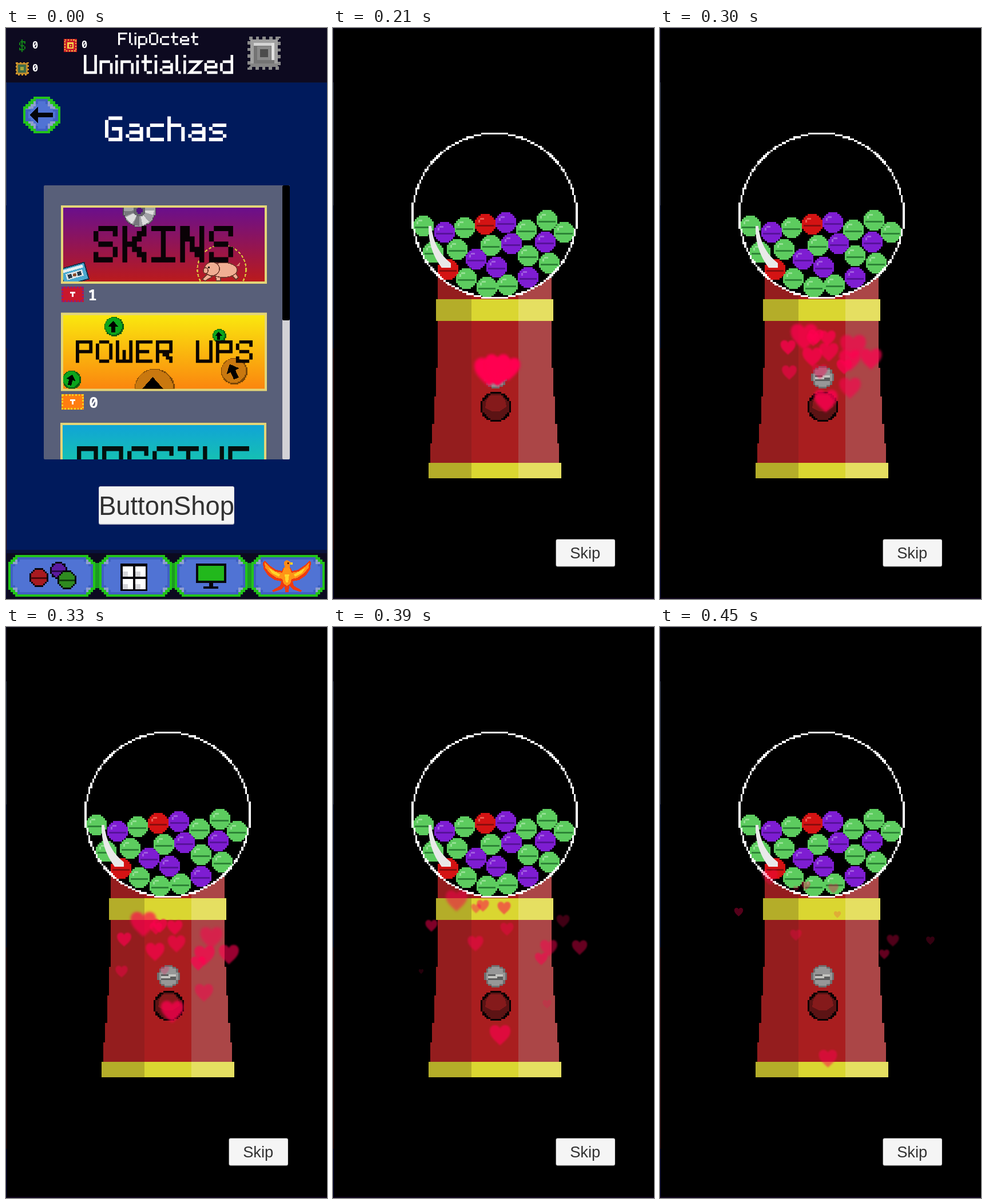
Recreate the animation shown at these times as an HTML page. Size 561 by 998 pixels, loop 550 ms.

```html
<!DOCTYPE html>
<html lang="en">
<head>
<meta charset="utf-8">
<title>Gachas</title>
<style>
html, body { margin: 0; width: 100%; height: 100%; overflow: hidden; background: #000; }
#stage { display: block; width: 100vw; height: 100vh; }
.sans { font-family: "Liberation Sans", Arial, sans-serif; fill: #323232; text-anchor: middle; }
.mono { font-family: "Noto Sans Mono", monospace; font-weight: 700; fill: #fff; }
</style>
</head>
<body>
<svg id="stage" viewBox="0 0 561 998" xmlns="http://www.w3.org/2000/svg"></svg>
<script>
const LOOP = 550, OPEN = 120, BURST = 210, STEP = 30;
const stage = document.getElementById('stage');

// ---- drawing helpers ----
const rect = (x, y, w, h, fill, more = '') =>
  `<rect x="${x}" y="${y}" width="${w}" height="${h}" fill="${fill}" ${more}/>`;
const path = (d, fill, more = '') => `<path d="${d}" fill="${fill}" ${more}/>`;
const text = (s, x, y, size, cls) =>
  `<text x="${x}" y="${y}" font-size="${size}" class="${cls}">${s}</text>`;
const group = (body, more = '') => `<g ${more}>${body}</g>`;
const crisp = body => group(body, 'shape-rendering="crispEdges"');
const crop = (x, y, w, h, body) =>
  `<svg x="${x}" y="${y}" width="${w}" height="${h}" viewBox="${x} ${y} ${w} ${h}">${body}</svg>`;

// Circle built from rows of square cells
function discPath(cx, cy, r, u) {
  const n = Math.round(2 * r / u), odd = n % 2;
  let d = '';
  for (let j = 0; j < n; j++) {
    const y = j + 0.5 - n / 2;
    const w = (2 * Math.round(Math.sqrt(n * n / 4 - y * y) - odd / 2) + odd) * u;
    d += `M${cx - w / 2} ${cy + (j - n / 2) * u}h${w}v${u}h${-w}z`;
  }
  return d;
}
const disc = (cx, cy, r, u, fill) => path(discPath(cx, cy, r, u), fill);

// Box with stepped corners
function stepBox(x, y, w, h, n, u, fill) {
  const c = n * u, run = s => s.repeat(n);
  return path(`M${x + c} ${y}h${w - 2 * c}` + run(`v${u}h${u}`) + `v${h - 2 * c}` +
    run(`h${-u}v${u}`) + `h${2 * c - w}` + run(`v${-u}h${-u}`) + `v${2 * c - h}` +
    run(`h${u}v${-u}`) + 'z', fill);
}

function plate(x, y, w, h, n, u) {
  const c = (n + 1) * u, box = (i, fill) =>
    stepBox(x + i * u, y + i * u, w - 2 * i * u, h - 2 * i * u, n, u, fill);
  return box(0, '#22c41a') + box(1, '#8e9fce') +
    rect(x + c, y + u, w - 2 * c, h - 2 * u, '#3f60c2') +
    rect(x + u, y + c, w - 2 * u, h - 2 * c, '#3f60c2') + box(2, '#5073d4');
}

// ---- pixel lettering, drawn as strokes on a 5 x 7 grid ----
const lower = {
  n: 'M0 2V6M1 2H3M4 3V6', i: 'M0 0h.01M0 2V6', t: 'M0 2H3M1 0V5M2 6H3',
  l: 'M0 0V5M1 6h.01', a: 'M1 2H3M4 3V6H1M0 5h.01M1 4H4', z: 'M0 2H4L0 6H4',
  e: 'M4 4V3M1 2H3M0 3V5M1 6H4M0 4H4', d: 'M4 0V6H1M0 5V3M1 2H4',
  c: 'M4 2H1M0 3V5M1 6H4', h: 'M0 0V6M0 2H3M4 3V6', p: 'M0 2V8M1 2H3M4 3V5M3 6H1',
  s: 'M4 2H1M0 3h.01M1 4H3M4 5h.01M3 6H0'
};
const upper = {
  S: 'M4 1V0H1M0 1V2M1 3H3M4 4V5M3 6H0V5', K: 'M0 0V6M4 0V1H3V2H2V3H0M2 3V4H3V5H4V6',
  I: 'M0 0H4M2 0V6M0 6H4', N: 'M0 6V0H1V2H2V4H3V5H4M4 0V6', P: 'M0 6V0H4V3H0',
  O: 'M1 0H3M4 1V5M3 6H1M0 5V1', W: 'M0 0V6H4V0M2 6V3', E: 'M4 0H0V6H4M0 3H3',
  R: 'M0 6V0H4V3H0M2 3V4H3V5H4V6', U: 'M0 0V6H4V0', A: 'M0 6V0H4V6M0 3H4',
  V: 'M0 0V4H1V5H2V6M4 0V4H3V5H2', F: 'M4 0H0V6M0 3H3', G: 'M4 0H1M0 1V5M1 6H4V3H2',
  T: 'M0 0H4M2 0V6'
};
const glyphs = { ...lower, ...upper };
const narrow = { i: 1, l: 2, t: 4 };

function word(s, x, y, ux, uy, color) {
  let at = 0, body = '';
  for (const ch of s) {
    if (glyphs[ch]) body += `<path transform="translate(${at} 0)" d="${glyphs[ch]}"/>`;
    at += (narrow[ch] || 5) + 1;
  }
  return group(body, `role="img" aria-label="${s}" fill="none" stroke="${color}" stroke-linecap="square"
    shape-rendering="auto" transform="translate(${x + ux / 2} ${y + uy / 2}) scale(${ux} ${uy})"`);
}

// ---- menu screen ----
const fade = (id, top, end) =>
  `<linearGradient id="${id}" x2="0" y2="1"><stop stop-color="${top}"/><stop offset="1" stop-color="${end}"/></linearGradient>`;
const frame = (x, y, w, h, fill, dash, width) =>
  rect(x, y, w, h, fill, `stroke="${dash}" stroke-width="${width}" stroke-dasharray="${width}"`);

function header() {
  return rect(0, 0, 561, 95, '#0d0a20') +
    word('S', 23, 23, 2.2, 2.3, '#128018') + rect(26.5, 20, 2.5, 22, '#128018') +
    rect(101, 19, 23, 23, '#c81c28') + frame(103, 21, 19, 19, 'none', '#f0c040', 2.4) +
    rect(107, 25, 11, 11, '#f2d34c') + rect(109.5, 27.5, 6, 6, '#c81c28') + rect(111.5, 29.5, 2, 2, '#f2d34c') +
    frame(18, 61, 20, 20, '#b07a20', '#d99a2a', 3) + rect(19, 62, 18, 18, '#b98a30') +
    rect(21, 64, 14, 14, '#3f6b4a') + rect(25, 68, 6, 6, '#a5a83c') +
    text(0, 46, 36, 17, 'mono') + text(0, 132, 35, 17, 'mono') + text(0, 46, 76, 17, 'mono') +
    word('FlipOctet', 196, 8, 3.18, 3.1, '#fff') + word('Uninitialized', 136, 47, 4.58, 4.75, '#fff') +
    frame(425, 18, 52, 52, 'none', '#8a8a8a', 5.8) + rect(427, 20, 48, 48, '#a0a0a0') +
    rect(427, 62, 48, 6, '#858585') + rect(433, 26, 36, 36, '#747474') +
    rect(433, 26, 36, 5, '#d4d4d4') + rect(464, 26, 5, 30, '#e0e0e0') +
    rect(439, 32, 24, 24, '#8a8a8a') + rect(444, 37, 14, 14, '#4c4c4c');
}

const upArrow = (x, y, s, tilt) =>
  path('M0 -9L8 0H3V9H-3V0H-8Z', '#000', `transform="translate(${x} ${y}) rotate(${tilt}) scale(${s})"`);
const coin = (x, y, r, main, dark, tilt) =>
  disc(x, y, r, 2, dark) + disc(x - 1, y - 1, r - 2.5, 2, main) +
  upArrow(x - r * 0.1, y, r / 15, tilt);

function banner(y, fill, body) {
  return rect(96, y, 360, 137, '#e3d578') +
    crop(100, y + 4, 352, 129, crisp(rect(100, y + 4, 352, 129, `url(#${fill})`) + body));
}

function skinsArt() {
  const pink = '#f0ad92', line = '#70392c';
  const blob = (x, y, rx, ry) => `<ellipse cx="${x}" cy="${y}" rx="${rx}" ry="${ry}" fill="${pink}" stroke="${line}" stroke-width="1.6"/>`;
  return disc(233, 319, 29, 2.2, '#4b4b50') + disc(233, 319, 27, 2.2, '#a2a2a6') +
    path('M233 319L209 331L220 343ZM233 319L239 345L250 339ZM233 319L257 327L259 319Z', '#dcdcdc') +
    path('M233 319L222 344L233 346ZM233 319L206 320L208 329Z', '#77777c') +
    disc(233, 319, 10, 2.2, '#66666c') + disc(233, 319, 5.5, 2.2, '#551080') +
    group(rect(0, 0, 46, 32, '#16304a') + rect(2, 2, 42, 28, '#4aa8d0') + rect(5, 4, 36, 5, '#e8eef0') +
      rect(8, 12, 30, 11, '#d9e2e6') + rect(11, 14, 7, 7, '#25394a') + rect(28, 14, 7, 7, '#25394a') +
      rect(20, 15, 6, 5, '#8a4b2a'), 'transform="translate(93 421) rotate(-16)"') +
    '<circle cx="377" cy="422" r="42.5" fill="none" stroke="#d9bd3c" stroke-width="2.4" stroke-dasharray="5 3"/>' +
    path('M352 430l-9 9 5 3 12 -7zM366 434l2 8h7v-8zM392 430l10 10 4 -4 -6 -10z', pink, `stroke="${line}" stroke-width="1.6"`) +
    blob(380, 423, 24, 13) + blob(360, 421, 13, 12) + blob(349, 424, 4, 5) +
    path('M358 410l3 -8 8 8zM402 416l7 -6 -1 6z', '#d98573') + rect(353, 417, 3, 3, '#20100c') +
    word('SKINS', 153, 346, 8.41, 9.1, '#0a0206');
}

function powerArt() {
  const green = ['#0ba51c', '#075c12'], brown = ['#c9780f', '#7b4706'];
  return coin(189, 522, 17, ...green, 0) + coin(373, 538, 12, ...green, 0) +
    coin(115, 615, 16, ...green, 15) + coin(260, 631, 35, ...brown, 0) + coin(399, 600, 23, ...brown, -25) +
    word('POWER UPS', 122, 546, 5.83, 5.6, '#0c0602');
}

const ticket = (y, fill, edge) => rect(97, y, 39, 27, fill) +
  frame(98.5, y + 1.5, 36, 24, 'none', edge, 2.8) + rect(112, y + 9, 9, 2.6, '#fff') + rect(115.2, y + 9, 2.6, 9, '#fff');

function phoenix() {
  const half = path('M0 12H6L9 18 19 16 31 8 39 0 42 3 41 14 33 26 21 34 10 36 12 44 26 52 24 55 10 50 4 44 3 55H0Z', '#ee3a12') +
    path('M0 12H5L8 21 20 19 31 11 39 3 38 12 30 22 18 30 8 32 6 40 0 44Z', '#ff9416') +
    path('M12 24L32 13 26 22 14 28ZM0 24H4L2 38H0Z', '#ffd52a');
  return group(half + group(half, 'transform="scale(-1 1)"') +
    path('M-5 2L0 -1 6 2 5 13H-4Z', '#ff8a16') + rect(6, 3, 4, 4, '#ffd52a') + rect(1, 3, 2, 3, '#300'),
    'transform="translate(491 931)"');
}

function footer() {
  const ball = (x, y, r, fill, dark) => disc(x, y, r + 1, 3, '#08060c') + disc(x, y, r - 2, 3, fill) +
    rect(x - r + 1, y, 2 * r - 2, 2.5, dark);
  const panes = [[204, 941], [226, 941], [204, 963], [226, 963]].map(([x, y]) =>
    rect(x, y, 18, 18, '#fff') + rect(x, y + 9, 9, 9, '#d6d6da')).join('');
  return rect(0, 912, 561, 86, '#0c0a20') + rect(0, 912, 561, 6, '#08123c') +
    rect(150, 935, 285, 44, '#1c9a22') +
    plate(4, 921, 152, 73, 3, 4) + plate(163, 921, 127, 73, 3, 4) +
    plate(295, 921, 127, 73, 3, 4) + plate(429, 921, 128, 73, 3, 4) +
    ball(57, 960, 15, '#a81a20', '#4c070a') + ball(92, 948, 14, '#5c1aa0', '#280848') + ball(106, 964, 15, '#2f8a20', '#10400c') +
    rect(200, 936, 47, 48, '#08060c') + panes +
    rect(332, 936, 53, 34, '#08060c') + rect(336, 940, 45, 26, '#22b81c') +
    rect(355, 970, 7, 7, '#08060c') + rect(345, 976, 26, 4, '#08060c') + phoenix();
}

function menu() {
  return rect(0, 0, 561, 998, '#001a5c') + crisp(header()) + rect(0, 95, 561, 1, '#061a48') +
    crisp(plate(30, 119.5, 65, 65, 4, 4.4) + path('M41 152L56 137V148H82V156H56V167Z', '#050508')) +
    word('Gachas', 173, 154.5, 6.06, 6.2, '#fff') +
    rect(66, 275, 430, 479, '#585f79', 'rx="2"') +
    banner(310, 'skins', skinsArt()) + banner(497.5, 'power', powerArt()) +
    crop(66, 275, 430, 479, rect(95, 690, 360, 137, '#e3d578') + rect(99, 694, 352, 129, 'url(#passive)') +
      word('PASSIVE', 124, 731, 7.34, 8.4, '#04100e')) +
    crisp(ticket(452, '#c9182c', '#86207e') + ticket(640, '#ff7d10', '#ffd21e')) +
    text(1, 143, 476, 27, 'mono') + text(0, 145, 664, 27, 'mono') +
    rect(483, 275, 13, 479, '#d2d2d6', 'rx="2"') + rect(483, 275, 13, 236, '#000', 'rx="2"') +
    rect(162, 801, 237, 67, '#b9bcc6', 'rx="3"') + rect(162.5, 801.5, 236, 65, '#f4f4f4', 'rx="3"') +
    text('ButtonShop', 280.5, 851, 45.3, 'sans') + crisp(footer());
}

// ---- gumball machine ----
const tones = {
  g: ['#5dcc5f', '#2d8436', '#93e093'],
  p: ['#7e1dd2', '#57129a', '#a05ce0'],
  r: ['#d41313', '#8a0d0d', '#ec5a50']
};
const balls = {
  g: [[158, 346], [230, 349], [338, 353], [374, 336], [404, 357], [175, 392], [217, 387], [276, 380],
    [341, 398], [378, 411], [233, 438], [269, 453], [305, 449]],
  p: [[195, 357], [302, 340], [312, 377], [371, 374], [250, 404], [286, 418], [341, 436]],
  r: [[266, 343], [201, 422]]
};

function ball(x, y, [main, dark, light]) {
  return disc(x, y, 18.2, 3.3, main) + rect(x - 15, y + 1, 30, 2.6, dark) +
    rect(x - 9, y - 11, 6.6, 3.3, light) + rect(x - 12, y - 8, 3.3, 5, light);
}

function machine() {
  const slab = (x0, x1, y, y1, [a, b, c]) => rect(x0, y, 242 - x0, y1 - y, a) +
    rect(242, y, 82, y1 - y, b) + rect(324, y, x1 - 324, y1 - y, c);
  const red = ['#941d1e', '#a91e1f', '#ab4647'], gold = ['#b4ad29', '#dad631', '#e5df61'];
  const body = [[183, 382, 430, 594], [180, 385, 594, 644], [177, 388, 644, 692], [173, 392, 692, 726], [170, 395, 726, 760]]
    .map(b => slab(...b, red)).join('');
  const gums = Object.keys(balls).map(k => balls[k].map(([x, y]) => ball(x, y, tones[k])).join('')).join('');
  const cx = 282.5, cy = 328, u = 3.3;
  return rect(0, 0, 561, 998, '#000') + rect(0, 0, 561, 1, '#0d0a20') + rect(0, 996, 561, 2, '#12081e') +
    crisp(body + slab(180, 385, 474, 512, gold) + slab(167, 399, 760, 787, gold) +
      disc(cx, cy, 145, u, '#000') + gums +
      path(discPath(cx, cy, 145.2, u) + discPath(cx, cy, 141.9, u), '#fff', 'fill-rule="evenodd"') +
      disc(284, 610.5, 20, u, '#6f6f6f') + disc(284, 610.5, 16.5, u, '#979797') +
      rect(271, 607, 26, 10, '#5e5e5e') + path('M271 610H284V607H297V611H287V614H271Z', '#c4c4c0') +
      disc(284.5, 662, 26.5, u, '#080203') + disc(284.5, 662, 23, u, '#5c1314') +
      path('M268 651L275 642H294L301 651 303 662 291 670H278L266 664Z', '#851a1b')) +
    path('M167 346H172Q176 388 206 411V419H190Q166 388 167 346Z', '#e9e9e9') +
    rect(389.5, 893.5, 103.5, 48, '#b4b4b4', 'rx="3"') + rect(390, 894, 102.5, 46.5, '#f5f5f5', 'rx="3"') +
    text('Skip', 440.7, 927, 27.3, 'sans');
}

// ---- heart burst: position at the third beat, travel per beat, size, life in beats ----
const BEAT = 60;
const hearts = [
  [216, 478, -24, -41, 56, 6], [262, 487, -7, -35, 31, 6.1], [250, 492, -12, -35, 28, 5.2],
  [299, 491, 4, -34, 33, 6.3], [304, 528, 6, -25.5, 41, 4.9], [249, 553, -11.5, -14.5, 41, 5.9],
  [172, 522, -34.5, -24, 31, 6], [154, 602, -48, 0, 35, 3.5], [402, 514, 43, -29, 58, 4],
  [377, 561, 30, -13, 45, 5.8], [364, 580, 28, -8, 31, 6.6], [431, 560, 41.5, -12, 46, 5],
  [374, 659, 28, 20, 50, 3.7], [272, 599, -5, -1, 45, 2.6], [292, 713, 1.5, 41, 47, 8]
];
const heartShape = 'M0 18C-6 12-18 4-18-7C-18-14-13-17-9-17C-4-17-1-14 0-11C1-14 4-17 9-17C13-17 18-14 18-7C18 4 6 12 0 18Z';

stage.innerHTML = '<defs>' + fade('skins', '#6a0f8c', '#ba1a1c') + fade('power', '#fae80e', '#fb860e') +
  fade('passive', '#10a4d6', '#1ce08c') +
  '<filter id="soft" x="-30%" y="-30%" width="160%" height="160%" color-interpolation-filters="sRGB"><feGaussianBlur stdDeviation="1.8"/></filter></defs>' +
  group(menu(), 'id="menu"') + group(machine(), 'id="machine"') +
  group(hearts.map(() => path(heartShape, '#ff0050', 'filter="url(#soft)"')).join(''), 'id="hearts"') +
  rect(0, 1, 1, 94, '#15122e') + rect(0, 95, 1, 215, '#3a4260') + rect(0, 310, 1, 250, '#101c48') +
  rect(0, 560, 1, 352, '#3c1218') + rect(0, 912, 1, 84, '#0a0a40');

const [menuEl, machineEl, burstEl] = ['menu', 'machine', 'hearts'].map(id => document.getElementById(id));
const heartEls = [...burstEl.children];
const show = (el, on) => el.setAttribute('display', on ? 'inline' : 'none');

function render(t) {
  show(menuEl, t < OPEN);
  show(machineEl, t >= OPEN);
  show(burstEl, t >= BURST);
  if (t < BURST) return;
  const beat = Math.min(Math.floor((t - BURST) / STEP), 8) * STEP / BEAT;
  hearts.forEach(([x, y, vx, vy, size, life], i) => {
    const age = beat / life, el = heartEls[i];
    show(el, age < 1);
    if (age >= 1) return;
    const k = beat - 3, scale = size * (1 - age * age) / 40;
    el.setAttribute('transform', `translate(${x + vx * k} ${y + vy * k}) scale(${scale})`);
    el.setAttribute('opacity', 1 - age);
  });
}

const start = performance.now();
function tick() {
  render((performance.now() - start) % LOOP);
  requestAnimationFrame(tick);
}
render(0);
requestAnimationFrame(tick);
</script>
</body>
</html>
```
